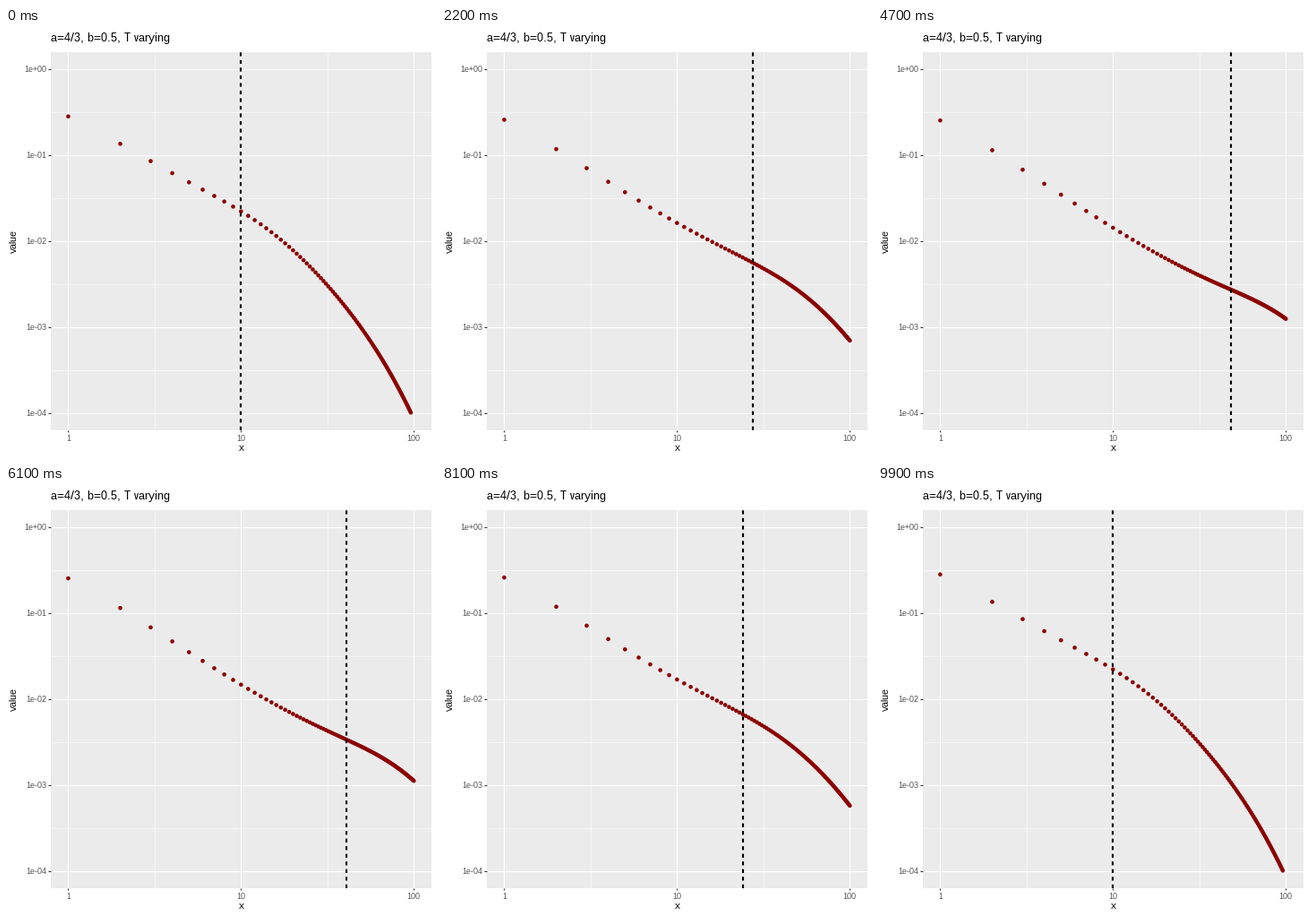
A matplotlib script that plays this animation: 480 px wide and 480 px high, repeating every 10000 ms.

```python
import numpy as np
import matplotlib.pyplot as plt
from matplotlib.animation import FuncAnimation
from matplotlib.patches import Rectangle

SIZE, DPI = 480, 96
PX = 72 / DPI  # points per pixel
FRAMES, INTERVAL = 100, 100
LEFT, RIGHT, TOP, BOTTOM = 50.2, 474.5, 27, 448.7
X0, X_DECADE = 69.45, 192.9
Y0, Y_DECADE = 46.2, 95.85
A, B = 4 / 3, 0.5

plt.rcParams.update({"font.family": "Liberation Sans",
                     "text.hinting": "default",
                     "text.hinting_factor": 1})


def px_x(log_x):
    return X0 + X_DECADE * log_x


def px_y(log_y):
    return Y0 - Y_DECADE * log_y


def log_value(x, T):
    """Power law, cut off near B, lifted around T, then decaying."""
    u = x / T
    height = 1.07 + 0.045 * T
    steepness = np.arctanh((1.03 + 0.0033 * T) / height)
    lift = 1 + height * np.tanh(steepness * u ** (1.15 + 0.008 * T))
    scale = 0.29 * (1 + 0.8 / T)
    log_y = np.log10(scale * x ** -A * (1 - np.exp(-x / B))
                     * lift * np.exp(-0.3 * u))
    return np.where(log_y < -4, np.nan, log_y)  # outside the axis limits


x = np.arange(1, 101)
log_x = np.log10(x)
periods = np.arange(10, 51, 10)
log_t = np.log10(periods)
curves = np.array([log_value(x, T) for T in periods])
LAST = FRAMES // 2 - 1
key_steps = np.floor(np.linspace(0, LAST, len(periods)) + 0.5)

fig = plt.figure(figsize=(SIZE / DPI, SIZE / DPI), dpi=DPI, facecolor="white")
ax = fig.add_axes([0, 0, 1, 1])
ax.set_xlim(0, SIZE)
ax.set_ylim(SIZE, 0)
ax.axis("off")


def line(xs, ys, color, width, z):
    return ax.plot(xs, ys, color=color, lw=width * PX, zorder=z,
                   solid_capstyle="butt", dash_capstyle="butt", snap=True)[0]


def label(px, py, text, size, color="black", **kw):
    ax.text(px, py, text, fontsize=size * PX, color=color,
            va="baseline", **kw)


ax.add_patch(Rectangle((LEFT, TOP), RIGHT - LEFT, BOTTOM - TOP,
                       color="#EBEBEB", lw=0, zorder=0))

for v in (0.5, 1.5):
    line([px_x(v)] * 2, [TOP, BOTTOM], "white", 0.53, 1)
for v in (-0.5, -1.5, -2.5, -3.5):
    line([LEFT, RIGHT], [px_y(v)] * 2, "white", 0.53, 1)

for v in range(3):
    line([px_x(v)] * 2, [TOP, BOTTOM], "white", 1.07, 2)
    line([px_x(v)] * 2, [BOTTOM, BOTTOM + 2.74], "#333333", 1.07, 2)
    label(px_x(v), 461, str(10 ** v), 8.8, "#4D4D4D", ha="center")
for v in range(5):
    line([LEFT, RIGHT], [px_y(-v)] * 2, "white", 1.07, 2)
    line([LEFT - 2.74, LEFT], [px_y(-v)] * 2, "#333333", 1.07, 2)
    label(45.3, px_y(-v) + 3.2, f"1e{'-' if v else '+'}{v:02d}", 8.8,
          "#4D4D4D", ha="right")

label(LEFT, 15, "a=4/3, b=0.5, T varying", 13.2)
label(262.4, 472.5, "x", 11, ha="center")
ax.text(14, 237.8, "value", fontsize=11 * PX, rotation=90, ha="right",
        va="center")

dots = ax.scatter(px_x(log_x), px_y(curves[-1]),
                  s=np.full(len(x), (4.6 * PX) ** 2),
                  color="#8B0000", linewidths=0, zorder=3)
marker = line([0, 0], [BOTTOM, TOP], "black", 2.13, 4)
marker.set_linestyle((0, (2, 2)))  # in line widths


def update(frame):
    step = min(frame, FRAMES - 1 - frame)  # forward, then rewind
    i = np.searchsorted(key_steps[1:-1], step, side="right")
    k = (step - key_steps[i]) / (key_steps[i + 1] - key_steps[i])
    log_y = (1 - k) * curves[i] + k * curves[i + 1]
    shown = ~np.isnan(log_y)
    dots.set_offsets(np.column_stack([px_x(log_x), px_y(log_y)])[shown])
    t = (1 - k) * log_t[i] + k * log_t[i + 1]
    marker.set_xdata([px_x(t)] * 2)
    return dots, marker


anim = FuncAnimation(fig, update, frames=FRAMES, interval=INTERVAL,
                     repeat=True, repeat_delay=0)
plt.show()
```
